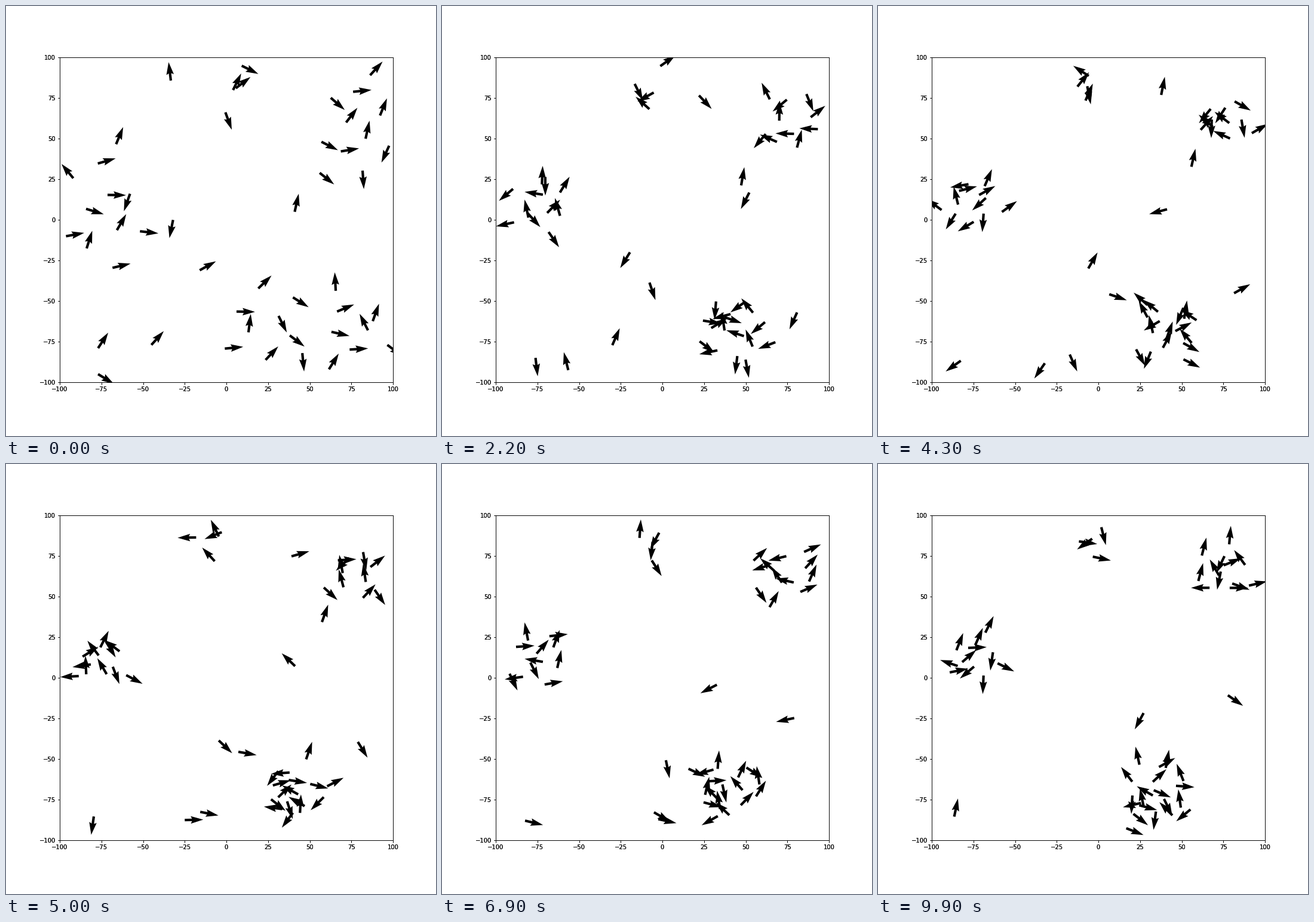
Animation, 720 px wide and 720 px high, one loop 10000 ms. Source, as a matplotlib script:

```python
import numpy as np
import matplotlib.pyplot as plt
from matplotlib.animation import FuncAnimation

FRAMES, INTERVAL = 100, 100
SIZE = 100          # half the side of the wrapping world
SPEED = 2.3         # distance per frame
WANDER = 0.45       # random turn per frame, radians
GATHER = 40         # frames a flock needs to close up
GOLDEN = np.pi * (3 - np.sqrt(5))

# count, first centre, first half-size, last centre, last radius
FLOCKS = [
    (11, (-75, 8), (25, 48), (-77, 13), 16),
    (10, (77, 60), (23, 38), (74, 66), 18),
    (16, (46, -68), (56, 30), (36, -72), 20),
    (4, (-10, 80), (45, 18), (-6, 84), 11),
]
# lone birds: where they begin and where they drift to
STRAYS = [
    ((56, 29), (26, -20)), ((-32, 0), (20, -72)), ((-16, -31), (31, -64)),
    ((-77, -79), (-84, -88)), ((-77, -95), (22, -78)),
    ((85, -68), (79, -9)), ((41, 5), (70, 62)), ((4, 80), (74, 72)),
    ((-45, -77), (13, -93)),
]

rng = np.random.default_rng(11)


def disc(n):
    """n evenly scattered points in the unit disc, turned at random."""
    k = np.arange(n)
    r, a = np.sqrt((k + 0.5) / n), k * GOLDEN + rng.uniform(0, 2 * np.pi)
    return np.column_stack([r * np.cos(a), r * np.sin(a)])


def flock_homes(count, centre, half, goal, radius):
    """Home of every bird over time, shape (frame, bird, 2)."""
    t = np.arange(FRAMES)[:, None, None]
    closing = 1 - (1 - np.minimum(t / GATHER, 1)) ** 2
    size = np.array(half) + (radius - np.array(half)) * closing
    middle = np.array(centre) + np.subtract(goal, centre) * t / (FRAMES - 1)
    return middle + size * disc(count)


def stray_homes(start, goal):
    t = np.linspace(0, 1, FRAMES)[:, None, None]
    return np.array(start) + np.subtract(goal, start) * t


def fly(homes, room):
    """Walk at constant speed, turning back whenever home is too far."""
    points = homes.copy()
    headings = np.empty(homes.shape[:2])
    headings[0] = np.radians(rng.normal(20, 70, homes.shape[1]))
    for i in range(1, FRAMES):
        gap = homes[i] - points[i - 1]
        heading = headings[i - 1] + rng.normal(0, WANDER, len(gap))
        turn = np.arctan2(gap[:, 1], gap[:, 0]) - heading
        turn = np.arctan2(np.sin(turn), np.cos(turn))
        far = np.hypot(gap[:, 0], gap[:, 1]) > room
        headings[i] = heading + 0.6 * turn * far
        step = np.column_stack([np.cos(headings[i]), np.sin(headings[i])])
        points[i] = points[i - 1] + SPEED * step
    return (points + SIZE) % (2 * SIZE) - SIZE, headings


homes = np.concatenate([flock_homes(*f) for f in FLOCKS]
                       + [stray_homes(*s) for s in STRAYS], axis=1)
points, headings = fly(homes, room=3)

plt.rcParams.update({"font.family": "DejaVu Sans", "font.size": 10})
fig = plt.figure(figsize=(10, 10), dpi=72, facecolor="white")

# a second copy gives the heavier look of the axis text
for _ in range(2):
    ax = fig.add_axes([0.125, 0.125, 0.775, 0.755], facecolor="none")
    ax.set(xlim=(-SIZE, SIZE), ylim=(-SIZE, SIZE),
           xticks=range(-SIZE, SIZE + 1, 25),
           yticks=range(-SIZE, SIZE + 1, 25))

arrows = ax.quiver(points[0, :, 0], points[0, :, 1],
                   np.cos(headings[0]), np.sin(headings[0]),
                   scale=18, width=0.0075, color="black")


def update(frame):
    arrows.set_offsets(points[frame])
    arrows.set_UVC(np.cos(headings[frame]), np.sin(headings[frame]))
    return arrows,


anim = FuncAnimation(fig, update, frames=FRAMES, interval=INTERVAL,
                     init_func=lambda: update(0), repeat=True,
                     repeat_delay=0, blit=False)
plt.show()
```
